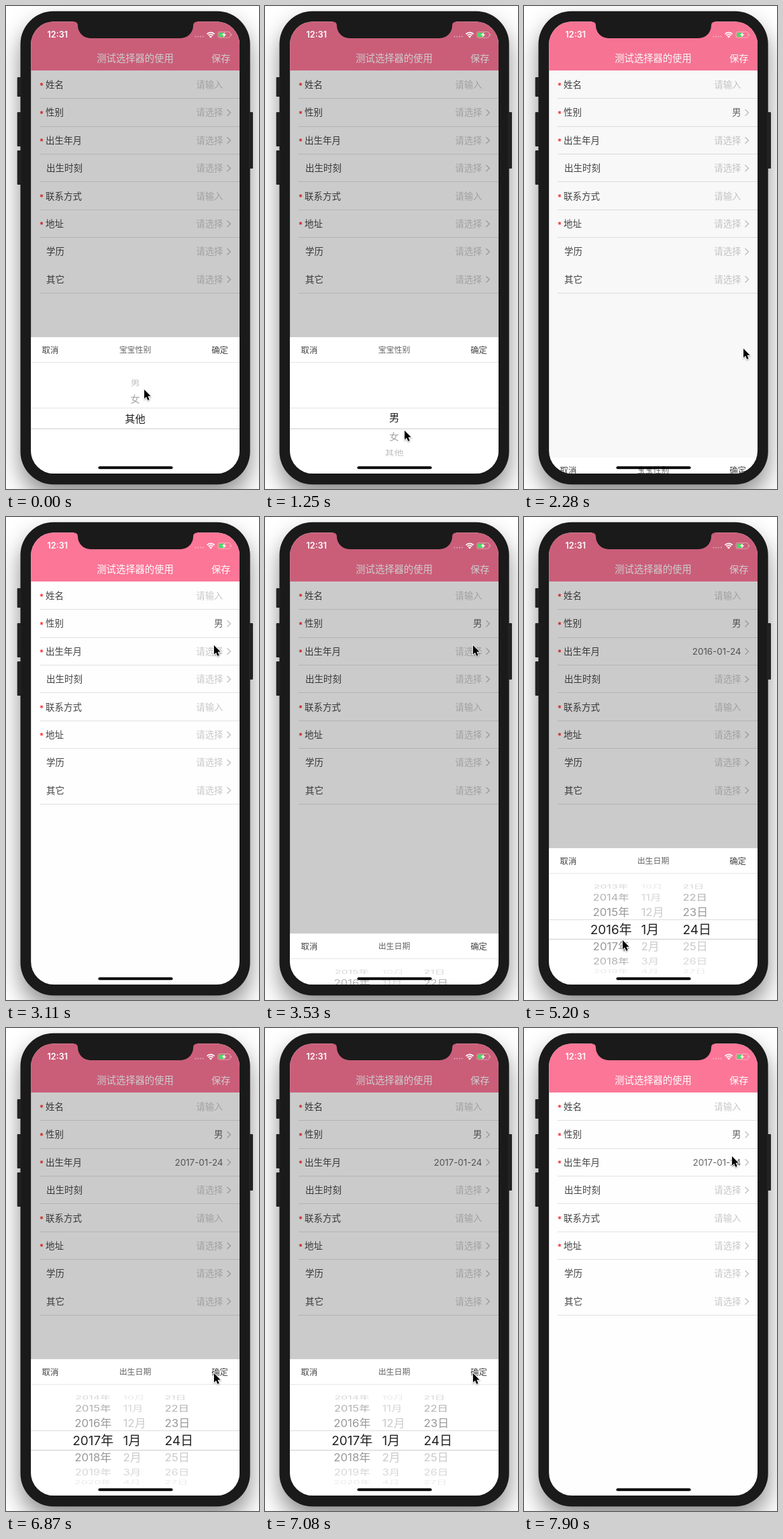
These frames come from a looping animation (377 by 719 pixels, 8 s). An HTML page with a canvas:

```html
<!DOCTYPE html>
<html lang="zh-CN">
<head>
<meta charset="utf-8">
<style>
  html, body { margin: 0; width: 100%; height: 100%; overflow: hidden; background: #fff; }
  canvas { display: block; width: 377px; height: 719px; }
</style>
</head>
<body>
<canvas id="stage"></canvas>
<script>
const W = 377, H = 719, LOOP = 8000, STEP = 207.8;
const BODY = '#1a1a1a';
const SCREEN = { x: 37.2, y: 23.2, w: 310.8, h: 672.8, r: 34 };
const ROW = 41.4, PANEL_TOP = 493, PANEL_TRAVEL = 203, SLIDE_MS = 300;
const FONT = 'Inter, "Noto Sans CJK SC", "Noto Sans CJK", sans-serif';

const canvas = document.getElementById('stage');
const ctx = canvas.getContext('2d');
const ratio = window.devicePixelRatio || 1;
canvas.width = W * ratio;
canvas.height = H * ratio;

const START = { x: 206, y: 571 };
const BIRTH_ROW = { x: 310, y: 191 };
const MOVES = [
  { from: 0, to: 6, x: 208, y: 632 },        // drag the gender wheel
  { from: 6, to: 11, x: 327, y: 510 },       // confirm
  { from: 11, to: 12.3, ...BIRTH_ROW },
  { from: 17, to: 21, x: 143, y: 578 },
  { from: 21, to: 25, x: 147, y: 630 },      // drag the year wheel back
  { from: 26, to: 30, x: 148, y: 602 },      // and one year forward
  { from: 30, to: 33, x: 310, y: 514 },      // confirm
  { from: 36, to: 38, ...BIRTH_ROW }
];

const mix = (a, b, p) => a + (b - a) * p;

function ease(now, from, to) {
  const p = Math.min(1, Math.max(0, (now - from) / (to - from)));
  return p * p * (3 - 2 * p);
}

function cursorAt(step) {
  return MOVES.reduce((at, move) => {
    const p = ease(step, move.from, move.to);
    return { x: mix(at.x, move.x, p), y: mix(at.y, move.y, p) };
  }, START);
}

function text(str, x, y, size, color, align = 'left', weight = 400) {
  ctx.font = `${weight} ${size}px ${FONT}`;
  ctx.textAlign = align;
  ctx.fillStyle = color;
  ctx.fillText(str, x, y + size * 0.37);
}

function rect(x, y, w, h, color) {
  ctx.fillStyle = color;
  ctx.fillRect(x, y, w, h);
}

function round(x, y, w, h, r, color) {
  ctx.beginPath();
  ctx.roundRect(x, y, w, h, r);
  ctx.fillStyle = color;
  ctx.fill();
}

function polygon(...points) {
  ctx.beginPath();
  points.forEach(p => ctx.lineTo(...p));
  ctx.closePath();
}

const hline = (x, y, color) => rect(x, y, W - x, 1, color);

function drawPhone() {
  rect(0, 0, W, H, '#fff');
  ctx.save();
  ctx.shadowColor = 'rgba(0,0,0,.45)';
  ctx.shadowBlur = 34 * ratio;
  ctx.shadowOffsetY = 18 * ratio;
  round(21.5, 7.8, 342.2, 704.4, 49, BODY);
  ctx.restore();
  round(16.7, 106, 6, 29, 1, '#222');
  round(16.7, 158, 6, 51, 1, '#222');
  round(16.7, 215, 6, 51, 1, '#222');
  round(362, 158, 6, 84, 1, '#222');
}

function drawForm(gender, birth) {
  rect(0, 0, W, H, '#fefefe');
  rect(0, 0, W, 96, '#fc7697');
  text('测试选择器的使用', 192.5, 78, 14.3, '#fff', 'center', 500);
  text('保存', 334.5, 78, 14.2, '#fff', 'right');
  const rows = [
    { label: '姓名', required: true, input: true },
    { label: '性别', required: true, value: gender },
    { label: '出生年月', required: true, value: birth },
    { label: '出生时刻' },
    { label: '联系方式', required: true, input: true },
    { label: '地址', required: true },
    { label: '学历', borderless: true },
    { label: '其它' }
  ];
  rows.forEach(({ label, required, input, value, borderless }, i) => {
    const y = 117 + i * ROW;
    if (required) text('*', 50, y + 2, 12, '#f00');
    text(label, required ? 59 : 60, y, 13.5, '#444');
    text(value || (input ? '请输入' : '请选择'), 323.5, y, 13.4, value ? '#666' : '#c8c8c8', 'right');
    if (!input) {
      ctx.beginPath();
      ctx.moveTo(329.5, y - 4.5);
      ctx.lineTo(334.5, y + 0.3);
      ctx.lineTo(329.5, y + 5);
      ctx.strokeStyle = '#c2c2c6';
      ctx.lineWidth = 1.4;
      ctx.stroke();
    }
    if (!borderless) hline(50, Math.floor(y + ROW / 2), '#e0e0e0');
  });
}

// Rows sit on a cylinder seen from the front.
function drawWheel({ pos, label, x, align, size, small, angle, radius, color, first = -Infinity, last = Infinity }) {
  for (let i = Math.round(pos) - 3; i <= Math.round(pos) + 3; i++) {
    if (i < first || i > last) continue;
    const turn = (i - pos) * angle, depth = Math.cos(turn);
    if (depth < 0.1) continue;
    const picked = Math.abs(i - pos) < 0.5;
    ctx.save();
    ctx.translate(x, 613.5 + radius * Math.sin(turn));
    ctx.scale(0.88 + 0.12 * depth, depth);
    ctx.globalAlpha = picked ? 1 : depth ** 1.2;
    text(label(i), 0, 0, picked ? size : small, picked ? '#222' : color(i), align);
    ctx.restore();
  }
}

function drawGenderWheel(pos) {
  hline(0, 598, '#e4e4e4');
  hline(0, 629, '#cfcfcf');
  drawWheel({
    pos, label: i => ['男', '女', '其他'][i], x: 192.5, align: 'center', size: 15.2, small: 14.6,
    angle: 0.419, radius: 71.5, color: () => '#999', first: 0, last: 2
  });
}

function drawDateWheels(year) {
  hline(0, 599, '#dcdcdc');
  hline(0, 628, '#cccccc');
  const shape = { size: 19, small: 17, angle: 0.372, radius: 70 };
  const shade = valid => valid ? '#8e8e8e' : '#c4c4c4';
  drawWheel({ ...shape, pos: year, label: i => i + '年', x: 129.7, align: 'center', color: i => shade(i <= 2018) });
  drawWheel({ ...shape, pos: 1, label: i => ((i + 11) % 12 + 1) + '月', x: 174.5, align: 'left', color: () => shade(false) });
  drawWheel({ ...shape, pos: 24, label: i => i + '日', x: 236.5, align: 'left', color: i => shade(i <= 24) });
}

function drawPanel(title, hidden, drawWheels) {
  ctx.save();
  ctx.translate(0, hidden * PANEL_TRAVEL);
  rect(0, PANEL_TOP, W, PANEL_TRAVEL, '#fff');
  text('取消', 53.5, 512, 12.4, '#444');
  text(title, 192.5, 512, 11.9, '#666', 'center');
  text('确定', 331, 512, 12.4, '#444', 'right');
  hline(0, 530, '#e6e6e6');
  drawWheels();
  ctx.restore();
}

function drawNotch() {
  ctx.fillStyle = BODY;
  ctx.beginPath();
  ctx.moveTo(101, 22);
  ctx.lineTo(101, 23.5);
  ctx.quadraticCurveTo(107, 23.5, 107, 29);
  ctx.arcTo(107, 48, 127, 48, 19);
  ctx.arcTo(279, 48, 279, 29, 19);
  ctx.quadraticCurveTo(279, 23.5, 285, 23.5);
  ctx.lineTo(285, 22);
  ctx.fill();
}

function drawStatus() {
  const faint = 'rgba(255,255,255,.45)';
  text('12:31', 61.5, 42.8, 12.6, '#fff', 'left', 600);
  for (let i = 0; i < 4; i++) round(281.5 + i * 3.7, 44.5, 2, 2, 1, faint);

  const fan = [-Math.PI * 0.76, -Math.PI * 0.24];
  ctx.strokeStyle = ctx.fillStyle = '#fff';
  ctx.lineWidth = 1.8;
  for (const r of [7.6, 4.6]) {
    ctx.beginPath();
    ctx.arc(305, 47, r, ...fan);
    ctx.stroke();
  }
  ctx.beginPath();
  ctx.moveTo(305, 47.5);
  ctx.arc(305, 47.5, 3, ...fan);
  ctx.fill();

  ctx.strokeStyle = faint;
  ctx.lineWidth = 0.9;
  ctx.beginPath();
  ctx.roundRect(316, 38.5, 18, 8.6, 2.2);
  ctx.stroke();
  round(335, 41.3, 1.2, 3, 0.6, faint);
  round(317.2, 39.7, 8.5, 6.2, 1, '#4cd964');
  polygon([326.5, 39], [321.5, 43.3], [324.6, 43.3], [323.5, 46.8], [328.5, 42.3], [325.4, 42.3]);
  ctx.fillStyle = '#fff';
  ctx.fill();
}

function drawCursor({ x, y }) {
  ctx.save();
  ctx.translate(x, y);
  ctx.scale(0.93, 0.93);
  polygon([0, 0], [0, 14.5], [3.3, 11.5], [5.6, 17], [8.2, 16], [5.9, 10.6], [10.4, 10.6]);
  ctx.shadowColor = 'rgba(0,0,0,.35)';
  ctx.shadowBlur = 2 * ratio;
  ctx.shadowOffsetY = ratio;
  ctx.strokeStyle = '#fff';
  ctx.lineWidth = 1.8;
  ctx.stroke();
  ctx.shadowColor = 'transparent';
  ctx.fillStyle = '#000';
  ctx.fill();
  ctx.restore();
}

function draw(now) {
  const step = Math.floor((now % LOOP + 12) / STEP);
  const t = step * STEP;
  const slide = start => ease(t, start, start + SLIDE_MS);
  const dateOpen = t >= 3408;
  const closed = slide(dateOpen ? 7281 : 2050);
  const hidden = dateOpen ? Math.max(closed, 1 - slide(3408)) : closed;
  const gender = mix(1.97, 0.05, ease(step, 0, 6));
  const year = 2018 - 2 * ease(step, 21, 25) + ease(step, 26, 30);
  const birth = step < 25 ? '' : `${step < 31 ? 2016 : 2017}-01-24`;

  ctx.setTransform(ratio, 0, 0, ratio, 0, 0);
  drawPhone();
  ctx.save();
  ctx.beginPath();
  ctx.roundRect(SCREEN.x, SCREEN.y, SCREEN.w, SCREEN.h, SCREEN.r);
  ctx.clip();
  drawForm(step < 10 ? '' : '男', birth);
  rect(0, 0, W, H, `rgba(0,0,0,${0.2 * (1 - closed)})`);
  if (dateOpen) drawPanel('出生日期', hidden, () => drawDateWheels(year));
  else drawPanel('宝宝性别', hidden, () => drawGenderWheel(gender));
  ctx.restore();
  drawNotch();
  drawStatus();
  round(137.5, 685.3, 111, 4, 2, '#000');
  drawCursor(cursorAt(step));
}

const begin = performance.now();
function loop() {
  draw(performance.now() - begin);
  requestAnimationFrame(loop);
}
loop();
</script>
</body>
</html>
```
